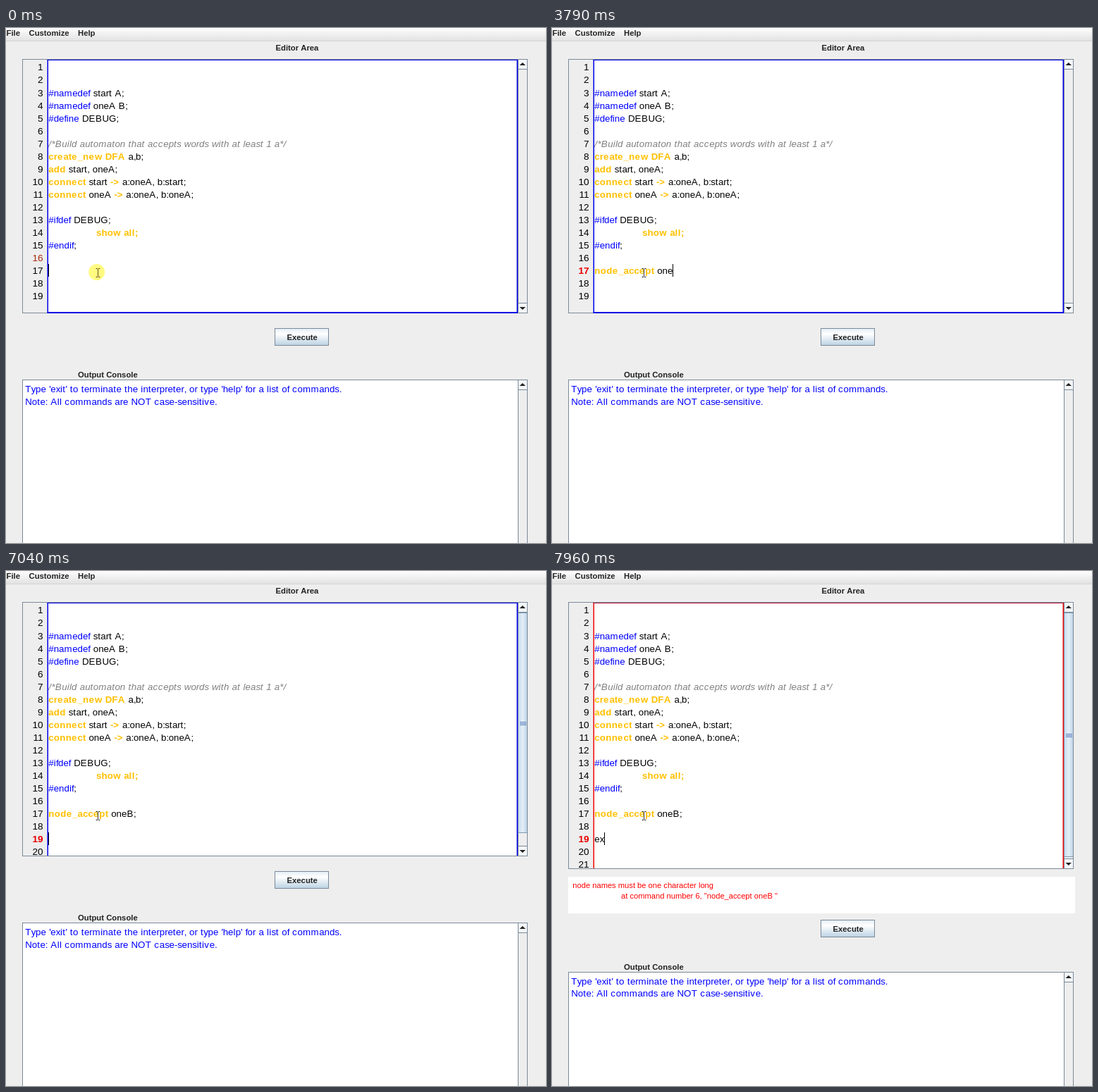
An HTML page with a canvas that plays this animation: 766x731 px, repeating every 8000 ms.

```html
<!DOCTYPE html>
<html lang="en">
<head>
<meta charset="utf-8">
<title>Automaton editor</title>
<style>
  html, body { margin: 0; width: 100%; height: 100%; overflow: hidden; background: #eee; }
  canvas { display: block; }
</style>
</head>
<body>
<canvas id="stage" width="766" height="731"></canvas>
<script>
const ctx = document.getElementById('stage').getContext('2d');
const LOOP = 8000, SANS = '"Liberation Sans", Arial, sans-serif';
const BLUE = '#0000ff', RED = '#f00', ORANGE = '#ffc000', STEEL = '#7a8a99';
const TEXT_X = 60.3, PITCH = 18.05;

const PROGRAM = ['', '', '#namedef start A;', '#namedef oneA B;', '#define DEBUG;', '',
  '/*Build automaton that accepts words with at least 1 a*/', 'create_new DFA a,b;',
  'add start, oneA;', 'connect start -> a:oneA, b:start;', 'connect oneA -> a:oneA, b:oneA;',
  '', '#ifdef DEBUG;', '\tshow all;', '#endif;', ''];

const TYPED = 'node_accept oneB;\n\nex';
const KEY_TIMES = [800, 990, 1060, 1190, 1780, 1980, 2250, 2450, 2520, 2590, 2850,
  3250, 3520, 3720, 3790, 4450, 4850, 5590, 6050, 7890, 7960];
const CARET_OFF = [[530, 800], [1650, 1780], [4250, 4450], [5330, 5590], [6510, 7040]];
const CHECKED = 7170, REPORTED = 7890;

const TOKENS = /(\/\*.*\*\/|#\w+|create_new DFA|show all;|node_accept|\badd\b|\bconnect\b|->)/;

function rect(x, y, w, h, color) {
  ctx.fillStyle = color;
  ctx.fillRect(x, y, w, h);
}

function frame(x, y, w, h, color) {
  ctx.strokeStyle = color;
  ctx.lineWidth = 1;
  ctx.strokeRect(x + .5, y + .5, w - 1, h - 1);
}

function gradient(x0, y0, x1, y1, ...colors) {
  const g = ctx.createLinearGradient(x0, y0, x1, y1);
  colors.forEach((c, i) => g.addColorStop(i / (colors.length - 1), c));
  return g;
}

function label(text, x, y, color = '#222', font = 'bold 11.3px ') {
  ctx.font = font + SANS;
  ctx.fillStyle = color;
  ctx.fillText(text, x, y);
}

// Glyph advances are whole pixels at 13px, enlarged with the window.
const HINTED = {
  '': { f: 3, s: 6, x: 6, y: 6, ',': 3, ':': 3, ';': 3, '.': 3 },
  'bold ': { e: 8, A: 10 }
};
const advances = {};
function advance(ch, style) {
  const key = style + ch;
  if (!(key in advances)) {
    ctx.font = style + '100px ' + SANS;
    const fixed = HINTED[style === 'bold ' ? style : ''][ch];
    advances[key] = 1.058 * (fixed || Math.round(ctx.measureText(ch).width * .13));
  }
  return advances[key];
}

function run(text, x, y, color, style = '') {
  for (const ch of text) {
    const step = advance(ch, style);
    label(ch, x, y, color, style + '13.3px ');
    x += step;
  }
  return x;
}

function codeLine(text, y) {
  let x = TEXT_X;
  if (text[0] === '\t') {
    x = 128;
    text = text.slice(1);
  }
  text.split(TOKENS).forEach((part, i) => {
    if (i % 2 === 0) x = run(part, x, y, '#000');
    else if (part[0] === '#') x = run(part, x, y, BLUE);
    else if (part[0] === '/') x = run(part, x, y, '#808080', 'italic ');
    else x = run(part, x, y, ORANGE, 'bold ');
  });
  return x;
}

function arrowButton(y, up) {
  rect(726, y, 14, 15, '#f4f6f8');
  frame(726, y, 14, 15, STEEL);
  const base = y + (up ? 9 : 6), tip = y + (up ? 5 : 10);
  ctx.fillStyle = '#222';
  ctx.beginPath();
  ctx.moveTo(728.5, base);
  ctx.lineTo(737, base);
  ctx.lineTo(732.75, tip);
  ctx.fill();
}

function scrollTrack(top, bottom) {
  rect(726, top, 14, bottom - top, '#eee');
  rect(726, top, 1, bottom - top, STEEL);
  rect(739, top, 1, bottom - top, STEEL);
  arrowButton(top, true);
}

function thumb(bottom) {
  rect(726, 59, 14, bottom - 59, gradient(726, 0, 740, 0, '#c4d8ea', '#e4eff8', '#b8cfe5'));
  frame(726, 59, 14, bottom - 59, '#7d98b3');
  const mid = Math.round((59 + bottom) / 2);
  for (const dy of [-2, 0, 2]) rect(729, mid + dy, 9, 1, '#6382bf');
}

function editor(t, lines, bottom, caretOn) {
  const border = t < CHECKED ? '#0000e6' : '#f00808';
  const overflow = lines.length > 17;
  const current = t < 130 ? 16 : lines.length;
  const count = Math.max(19, lines.length + 2);

  rect(23, 44, 717, bottom - 44, '#fff');
  rect(24, 45, 35, bottom - 46, '#eee');

  ctx.save();
  ctx.beginPath();
  ctx.rect(24, 45, 702, bottom - 46);
  ctx.clip();

  if (t < 130) {
    ctx.fillStyle = '#fffa80';
    ctx.beginPath();
    ctx.arc(128.7, 346.5, 11.5, 0, 7);
    ctx.fill();
  }

  let caretX = TEXT_X;
  for (let n = 1; n <= count; n++) {
    const y = Math.round(60.4 + PITCH * (n - 1));
    const active = n === current;
    ctx.textAlign = 'right';
    label(n, 52.5, y, !active ? '#000' : t < 130 ? '#a82810' : '#e80000',
      (active && t >= 130 ? 'bold ' : '') + '13.6px ');
    ctx.textAlign = 'left';
    if (n <= lines.length) caretX = codeLine(lines[n - 1], y);
  }
  if (caretOn) rect(Math.round(caretX), Math.round(46 + PITCH * (lines.length - 1)), 1, 18, '#000');
  ctx.restore();

  scrollTrack(44, bottom);
  if (overflow) thumb(t >= CHECKED ? 406 : lines.length > 18 ? 372 : 388);
  arrowButton(bottom - 15, false);
  frame(23, 44, 717, bottom - 44, STEEL);

  rect(58.5, 45, 1.5, bottom - 46, border);
  rect(724.5, 45, 1.5, bottom - 46, border);
  rect(58.5, 45, 667.5, 1, t < CHECKED ? border : '#b01838');
  if (!overflow) rect(58.5, bottom - 2, 667.5, 2, border);
}

function mouse(color) {
  rect(130, 342, 1, 11, color);
  for (const y of [341, 353]) {
    rect(127.5, y, 2.5, 1, color);
    rect(131, y, 2.5, 1, color);
  }
}

function executeButton(y) {
  rect(382, y, 76, 25, gradient(0, y, 0, y + 25, '#e2edf5', '#fff', '#dce8f1', '#b8d0e2'));
  frame(381, y, 77, 25, STEEL);
  label('Execute', 398.5, y + 17);
}

function outputConsole(top) {
  label('Output Console', 102, top - 3);
  rect(23, top, 717, 731 - top, '#fff');
  scrollTrack(top, 740);
  frame(23, top, 717, 800 - top, STEEL);
  run("Type 'exit' to terminate the interpreter, or type 'help' for a list of commands.",
    27.3, top + 18, BLUE);
  run('Note: All commands are NOT case-sensitive.', 27.3, top + (top > 499 ? 35 : 36), BLUE);
}

function draw(t) {
  const typed = TYPED.slice(0, KEY_TIMES.filter(k => k <= t).length);
  const lines = [...PROGRAM, ...typed.split('\n')];
  const caretOn = !CARET_OFF.some(([from, to]) => t >= from && t < to);
  const shift = t >= REPORTED ? 70 : t >= CHECKED ? 24 : 0;

  rect(0, 0, 766, 731, '#eee');
  rect(0, 0, 766, 18, gradient(0, 0, 0, 18, '#fdfdfd', '#e2e2e2'));
  rect(0, 18, 766, 1, '#d4d4d4');
  label('File', .5, 11);
  label('Customize', 32.5, 11);
  label('Help', 102, 11);
  label('Editor Area', 382.5, 32);

  editor(t, lines, t < CHECKED ? 405 : 423, caretOn);
  mouse(t < 130 ? '#70501c' : '#333');

  if (t >= CHECKED) rect(23, 434, 719, t >= REPORTED ? 52 : 6, '#fff');
  if (t >= REPORTED) {
    label('node names must be one character long', 29.3, 450, RED, '11.16px ');
    label('at command number 6, "node_accept oneB "', 98, 465, RED, '11.16px ');
  }
  executeButton(426 + (shift === 70 ? 69 : shift));
  outputConsole(499 + shift);
}

function tick() {
  draw(performance.now() % LOOP);
  requestAnimationFrame(tick);
}
tick();
</script>
</body>
</html>
```
